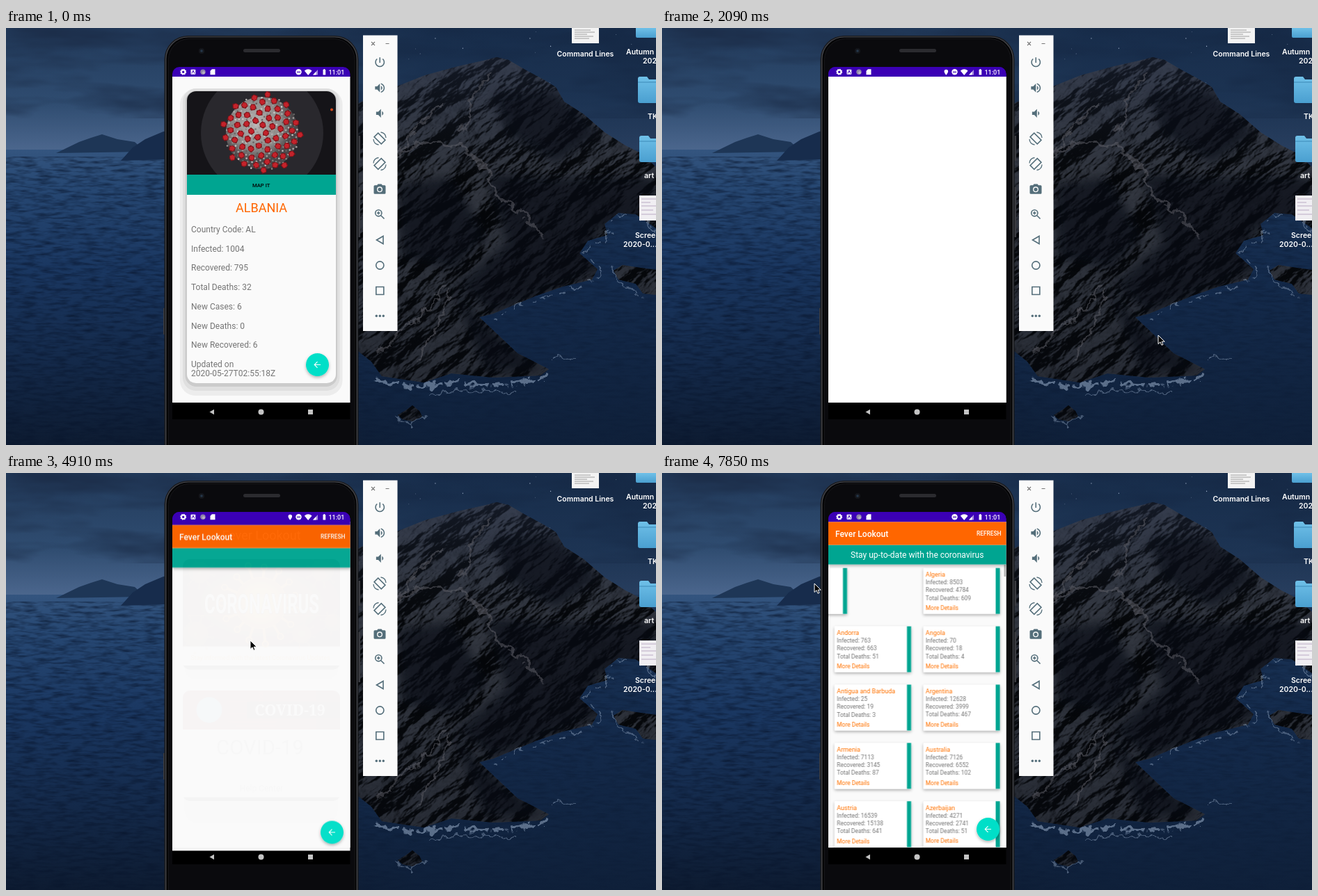
These frames come from a looping animation (934 px wide and 600 px high, 7.99 s). An HTML page:

```html
<!DOCTYPE html>
<html lang="en">
<head>
<meta charset="utf-8">
<title>Phone emulator on a desktop</title>
<style>
html, body { margin: 0; width: 100%; height: 100%; overflow: hidden; background: #0f1f38; }
svg { position: absolute; left: 0; top: 0; width: 934px; height: 600px; }
#scenery { will-change: transform; }
text { font-family: Roboto, sans-serif; }
.mid { text-anchor: middle; }
.grey { fill: #757575; }
.label { font: 600 10.5px Inter, sans-serif; fill: #fff; }
.t12 { font-size: 12px; }
.small { font-size: 8.4px; }
.medium { font-weight: 500; }
.slab { font-family: "Noto Serif", serif; font-weight: 900; }
.tool { fill: #546e7a; }
.line { fill: none; stroke: #546e7a; stroke-width: 1.6; }

#detail, #blank, #home, #list, #dim, #pin, #cursor, .loaded, .card, .swiped, .dragged {
  animation: 7.99s step-end infinite;
}
#blank, #home, #list, #dim, #pin, #cursor, .loaded { opacity: 0; }
#blank { animation-name: blank; }
#home { animation-name: home; }
#list { animation-name: list; }
#dim { animation-name: dim; }
#pin { animation-name: pin; }
.loaded { animation-name: loaded; }
#cursor { animation-name: cursor; }
.card.left { animation-name: up-right; }
.card.right { animation-name: step-left; }
.swiped { animation-name: swipe; }
.dragged { animation-name: drag; }

@keyframes blank {
  22.4% { opacity: .27; transform: translateY(25.5px); }
  24.28% { opacity: .8; transform: translateY(8px); }
  26.15%, 99% { opacity: 1; transform: none; }
}
@keyframes dim {
  22.4% { opacity: .35; }
  24.28% { opacity: .2; }
  26.15% { opacity: 0; }
  59.57% { opacity: .3; }
  61.45% { opacity: 0; }
}
@keyframes home {
  31.78% { opacity: .94; }
  33.66%, 99% { opacity: 1; }
}
@keyframes list {
  59.57% { opacity: .35; transform: translateY(24px); }
  61.45% { opacity: .98; transform: translateY(4.5px); }
  63.2%, 99% { opacity: 1; transform: none; }
}
@keyframes pin { 16.77% { opacity: 1; } 92.74% { opacity: 0; } }
@keyframes loaded { 68.83%, 99% { opacity: 1; } }
@keyframes step-left {
  89.11% { transform: translateX(-85px); }
  90.86%, 99% { transform: translateX(-127.5px); }
}
@keyframes up-right {
  89.11% { transform: translate(85px, -56px); }
  90.86%, 99% { transform: translate(127.5px, -83.9px); }
}
@keyframes swipe {
  83.47% { transform: translateX(100px); }
  85.35%, 99% { transform: translateX(350px); }
}
@keyframes drag { 98.24%, 99.9% { transform: translateX(-92px); } }
@keyframes cursor {
  7.5% { opacity: 1; transform: translate(916px, 36px); }
  9.38% { opacity: 1; transform: translate(790px, 260px); }
  11.13% { opacity: 1; transform: translate(708px, 430px); }
  13.01% { opacity: 1; transform: translate(713px, 442px); }
  37.42% { opacity: 1; transform: translate(680px, 418px); }
  39.17% { opacity: 1; transform: translate(600px, 373px); }
  41.05% { opacity: 1; transform: translate(440px, 277px); }
  42.92% { opacity: 1; transform: translate(365px, 240px); }
  44.68% { opacity: 1; transform: translate(352px, 236px); }
  54.06% { opacity: 1; transform: translate(351px, 241px); }
  70.71% { opacity: 1; transform: translate(348px, 235px); }
  72.46% { opacity: 1; transform: translate(340px, 222px); }
  74.34% { opacity: 1; transform: translate(330px, 205px); }
  76.22% { opacity: 1; transform: translate(318px, 188px); }
  77.97% { opacity: 1; transform: translate(309px, 175px); }
  79.84% { opacity: 1; transform: translate(303px, 168px); }
  81.72% { opacity: 1; transform: translate(300px, 165px); }
  83.47% { opacity: 1; transform: translate(400px, 165px); }
  85.35% { opacity: 1; transform: translate(650px, 165px); }
  87.23% { opacity: 1; transform: translate(391px, 157px); }
  89.11% { opacity: 1; transform: translate(340px, 158px); }
  90.86% { opacity: 1; transform: translate(320px, 160px); }
  92.74% { opacity: 1; transform: translate(311px, 159px); }
  98.24%, 99.9% { opacity: 1; transform: translate(219px, 159px); }
}
</style>
</head>
<body>
<svg id="scenery" viewBox="0 0 934 600">
  <defs>
    <linearGradient id="sky" x2="0" y2="1">
      <stop offset="0" stop-color="#223b5c"/><stop offset=".6" stop-color="#2f4c70"/><stop offset="1" stop-color="#4d688f"/>
    </linearGradient>
    <linearGradient id="rightShade"><stop offset=".35" stop-color="#10233f" stop-opacity="0"/><stop offset=".65" stop-color="#10233f" stop-opacity=".6"/></linearGradient>
    <linearGradient id="sea" x2="0" y2="1">
      <stop offset="0" stop-color="#34557f"/><stop offset=".12" stop-color="#274873"/><stop offset=".4" stop-color="#1a3761"/><stop offset=".7" stop-color="#142a4b"/><stop offset="1" stop-color="#0d1b31"/>
    </linearGradient>
    <linearGradient id="rockShade" x2="0" y2="1">
      <stop offset="0" stop-color="#2a3650" stop-opacity=".5"/><stop offset=".35" stop-color="#10161f" stop-opacity=".3"/><stop offset="1" stop-color="#0b101a" stop-opacity=".5"/>
    </linearGradient>
    <filter id="rock" x="0" y="0" width="1" height="1" color-interpolation-filters="sRGB">
      <feTurbulence type="fractalNoise" baseFrequency=".011 .03" numOctaves="6" seed="21"/>
      <feDiffuseLighting surfaceScale="34" diffuseConstant=".95" lighting-color="#454953"><feDistantLight azimuth="250" elevation="38"/></feDiffuseLighting>
    </filter>
    <filter id="waves" x="0" y="0" width="1" height="1" color-interpolation-filters="sRGB">
      <feTurbulence type="fractalNoise" baseFrequency=".045 .24" numOctaves="3" seed="3"/>
      <feColorMatrix values="0 0 0 0 .03  0 0 0 0 .08  0 0 0 0 .17  1.3 0 0 0 -.5"/>
    </filter>
    <filter id="clouds" x="0" y="0" width="1" height="1" color-interpolation-filters="sRGB">
      <feTurbulence type="fractalNoise" baseFrequency=".006 .024" numOctaves="4" seed="5"/>
      <feColorMatrix values="0 0 0 0 .11  0 0 0 0 .18  0 0 0 0 .29  2 0 0 0 -.8"/>
    </filter>
    <filter id="rough" x="-.1" y="-.2" width="1.2" height="1.4" color-interpolation-filters="sRGB">
      <feTurbulence type="fractalNoise" baseFrequency=".07" numOctaves="3" seed="4"/>
      <feDisplacementMap in="SourceGraphic" scale="20" xChannelSelector="R" yChannelSelector="G"/>
    </filter>
    <filter id="blur" x="-.3" y="-.3" width="1.6" height="1.6" color-interpolation-filters="sRGB"><feGaussianBlur stdDeviation="7"/></filter>
    <clipPath id="cliff">
      <path d="M490 115 562 84 602 68 650 55 690 46 705 42 722 46 746 60 772 74 790 85 802 106 830 124 860 150 890 169 912 180 934 200V288L905 268 880 266 860 282 864 298 836 306 824 324 850 347 842 362 800 372 760 386 700 411 680 416 735 468 780 491 768 500 700 503 640 497 600 510 540 501 525 480 500 460Z"/>
      <path d="M873 349 886 341 905 344 934 348V384L915 382 905 368 880 362ZM563 557 576 549 584 543 594 551 598 559 584 566 570 563Z"/>
    </clipPath>
  </defs>
  <rect width="934" height="180" fill="url(#sky)"/>
  <rect width="934" height="130" filter="url(#clouds)"/>
  <rect y="175" width="934" height="425" fill="url(#sea)"/>
  <rect y="185" width="934" height="415" filter="url(#waves)"/>
  <rect width="934" height="600" fill="url(#rightShade)"/>
  <path d="M72 180 105 164 122 158 138 153 160 160 185 164 200 178Z" fill="#1e3656"/>
  <path d="M165 191 182 172 200 160 226 149 260 145V188Z" fill="#172c4c"/>
  <g id="stars" fill="#a9bad2"></g>
  <g clip-path="url(#cliff)">
    <rect x="400" y="-40" width="640" height="700" transform="rotate(-38 712 300)" filter="url(#rock)"/>
    <rect x="490" y="30" width="444" height="550" fill="url(#rockShade)"/>
    <g filter="url(#blur)" fill="#080c15" opacity=".65">
      <path d="M700 95 790 90 850 150 790 195 720 150ZM565 225 640 215 690 300 645 345 570 330ZM640 370 680 420 770 490 690 495Z"/>
      <path d="M690 210 800 215 934 215V290L850 290 850 350 700 410 650 370 720 310Z"/>
    </g>
    <g filter="url(#rough)" fill="none" stroke="#62636b" stroke-width="4" opacity=".5">
      <path d="M545 190 600 165 655 168 690 205 708 245 740 262 770 300"/>
      <path d="M632 366 610 400 575 430 535 470M640 375 620 430 590 480M625 110 590 140 565 185M700 60 670 100 655 150" stroke-width="3"/>
    </g>
  </g>
  <g fill="none" stroke="#8ea2bc" filter="url(#rough)">
    <path d="M934 292 905 273 880 270 864 284 868 301 842 310 830 326 855 349 846 366 800 378 700 416" stroke-width="2" stroke-dasharray="16 9 7 12" opacity=".5"/>
    <path d="M530 505 600 517 640 508 700 514 770 506 786 494" stroke-width="5" stroke-dasharray="34 6 17 9" opacity=".6"/>
    <path d="M610 526 660 522 735 524M785 475 825 476M870 342 880 366 912 386M560 561 580 570 606 558" stroke-width="2" opacity=".45"/>
  </g>
</svg>

<svg viewBox="0 0 934 600">
  <defs>
    <linearGradient id="folder" x2="0" y2="1"><stop offset="0" stop-color="#6fc0e8"/><stop offset="1" stop-color="#4a9fd0"/></linearGradient>
    <radialGradient id="ember" r=".62"><stop offset="0" stop-color="#c25a0c"/><stop offset=".45" stop-color="#7d2f08"/><stop offset="1" stop-color="#2c0e06"/></radialGradient>
    <radialGradient id="core"><stop offset="0" stop-color="#ffcf45"/><stop offset=".6" stop-color="#f0920f"/><stop offset="1" stop-color="#b5500a"/></radialGradient>
    <radialGradient id="ball" cx=".42" cy=".38"><stop offset="0" stop-color="#b9b6b5"/><stop offset=".7" stop-color="#8b8887"/><stop offset="1" stop-color="#4b484a"/></radialGradient>
    <linearGradient id="maroon"><stop offset="0" stop-color="#7a0f1c"/><stop offset=".5" stop-color="#930e20"/><stop offset="1" stop-color="#5d0d16"/></linearGradient>
    <filter id="soft" x="-.2" y="-.2" width="1.4" height="1.5"><feDropShadow dx="0" dy="2" stdDeviation="2" flood-opacity=".3"/></filter>
    <clipPath id="screen"><path d="M239 563V66a10 10 0 0 1 10-10H484.500a10 10 0 0 1 10 10V563Z"/></clipPath>
    <clipPath id="listArea"><path d="M239 131.500H495V539H239Z"/></clipPath>
    <clipPath id="detailCard"><rect x="260" y="91" width="214" height="420" rx="13"/></clipPath>
    <clipPath id="newsCard"><rect x="254" y="124" width="226" height="159" rx="10"/></clipPath>
    <clipPath id="helpCard"><rect x="254" y="313" width="226" height="159" rx="10"/></clipPath>
    <g id="fab" filter="url(#soft)">
      <circle r="16.5" fill="#00dfc8"/>
      <path d="M4.5 0H-4M0-4.3-4.3 0 0 4.3" fill="none" stroke="#fff" stroke-width="1.1"/>
    </g>
    <g id="turn" class="line">
      <rect x="-4" y="-7.200" width="8" height="14.400" transform="rotate(-45)"/>
      <path d="M1.500-9Q8.500-8 9-1M-1.500 9Q-8.500 8-9 1" stroke-width="1.300"/>
    </g>
  </defs>

  <!-- desktop icons -->
  <path d="M813 0H852V22H813Z" fill="#f3f3f3"/>
  <path d="M817 3H840M817 6H846M817 9H835M817 12H844M817 15H838" stroke="#888" stroke-width=".8"/>
  <g fill="url(#folder)">
    <path d="M905 0H934V14H907a2 2 0 0 1-2-2Z"/>
    <path id="dir" d="M908 73q0-3 3-3h10l3 4h14V108H911q-3 0-3-3Z"/>
    <use href="#dir" x="2" y="85"/>
  </g>
  <path d="M908 78H934M910 163H934" stroke="#3d8ab8" stroke-width="1"/>
  <path d="M910 241H934V277H910Z" fill="#f0eef2"/>
  <path d="M913 246H934M913 251H926M913 256H934M913 262H930M913 268H934" stroke="#b9a9c4" stroke-width="1.2"/>
  <text class="label mid" x="832.5" y="41">Command Lines</text>
  <text class="label" x="891" y="38">Autumn Le</text><text class="label" x="915" y="51">202</text>
  <text class="label" x="922" y="131">TK</text><text class="label" x="917" y="216">art</text>
  <text class="label" x="904" y="302">Screen</text><text class="label" x="887" y="315">2020-0...</text>

  <!-- phone body -->
  <path d="M226 403h3v38h-3zM506 155h3v36h-3zM506 229h3v72h-3z" fill="#3a3b40"/>
  <rect x="227.500" y="11" width="279" height="640" rx="34" fill="#1b1c1f"/>
  <rect x="229.800" y="13" width="274.500" height="640" rx="32" fill="#050506" stroke="#4b4c52" stroke-width="1.200"/>
  <rect x="233.500" y="15.500" width="267.500" height="640" rx="30" fill="#0a0a0d" stroke="#1c1c20" stroke-width=".8"/>
  <rect x="341" y="30" width="53" height="5" rx="2.500" fill="#2b2b2f"/>
  <circle cx="281" cy="33" r="4" fill="#15171c"/><circle cx="281" cy="33" r="1.800" fill="#25374a"/>

  <!-- phone screen -->
  <g clip-path="url(#screen)">
    <path d="M239 56H495V563H239Z"/>
    <path d="M239 56H495V71H239Z" fill="#3b00b5"/>

    <g id="detail">
      <path d="M239 70H495V539H239Z" fill="#fafafa"/>
      <rect x="250" y="88" width="233.500" height="441" rx="22" fill="#ececec"/>
      <rect x="254" y="87" width="225.500" height="435" rx="19" fill="#dfdfdf"/>
      <rect x="257.500" y="90" width="218.500" height="426" rx="16" fill="#cbcbcb"/>
      <g clip-path="url(#detailCard)">
        <path d="M260 91H474V511H260Z" fill="#fafafa"/>
        <path d="M260 91H474V211H260Z" fill="#151418"/>
        <circle cx="368" cy="151" r="88" fill="#29282d"/>
        <circle cx="468" cy="117.500" r="2" fill="#d2491c"/>
        <circle cx="368" cy="151" r="52" fill="url(#ball)"/>
        <g id="virus"></g>
        <path d="M260 211H474V240H260Z" fill="#00a591"/>
      </g>
      <text class="mid medium" x="366.700" y="228.700" font-size="7.700">MAP IT</text>
      <text class="mid" x="367" y="265" font-size="18" fill="#f60">ALBANIA</text>
      <g id="facts" class="grey t12"></g>
      <use href="#fab" x="447.500" y="484.500"/>
    </g>

    <path id="dim" d="M239 82H495V563H239Z"/>

    <g id="blank">
      <path d="M239 56H495V539H239Z" fill="#fff"/>
      <path d="M239 56H495V70H239Z" fill="#3b00b5"/>
    </g>

    <g id="home">
      <path d="M239 70H495V539H239Z" fill="#fff"/>
      <path d="M239 70H495V106H239Z"/>
      <text class="mid" x="367" y="95.500" font-size="18" fill="#fff">Fever Lookout</text>
      <path d="M270 119H465Q488 120 490 150L493 270Q490 300 478 310H256Q243 300 240 270L244 150Q246 120 270 119Z" fill="#ebebeb"/>
      <rect x="240" y="302" width="253.500" height="217" rx="30" fill="#e7e7e7"/>
      <rect x="256" y="140" width="222" height="157.500" rx="18" fill="#d8d8d8"/>
      <rect x="256" y="330" width="221" height="174" rx="20" fill="#d6d6d6"/>
      <g clip-path="url(#newsCard)">
        <path d="M254 124H480V283H254Z" fill="#fff"/>
        <path d="M254 124H480V249.500H254Z" fill="url(#ember)"/>
        <g id="corona"></g>
        <path d="M262 205H472" stroke="#ff8a2a" stroke-width=".8" opacity=".7"/>
        <text class="mid" transform="translate(367.500 202) scale(1 1.650)" font-size="24" font-weight="700" fill="#f6ece0" stroke="#4a1c08" stroke-width=".8" paint-order="stroke">CORONAVIRUS</text>
        <path d="M254 277H480V283H254Z"/>
      </g>
      <text class="mid" x="365.500" y="269" font-size="9" fill="#ff7b00">Stay informed with the latest Coronavirus Updates</text>
      <g clip-path="url(#helpCard)">
        <path d="M254 313H480V472H254Z" fill="#fff"/>
        <path d="M254 313H480V369H254Z" fill="url(#maroon)"/>
        <path d="M254 329H350M290 346H420M254 358H400M330 364H440" stroke="#c02a3a" opacity=".35"/>
        <path d="M346 329H480V353H346Z" fill="#1d0a0d" opacity=".65"/>
        <circle cx="292" cy="341" r="18.500" fill="#4d93b8"/>
        <text class="mid slab" x="408" y="348.500" font-size="21.500" fill="#fff">COVID-19</text>
        <path d="M254 466.500H480V472H254Z"/>
      </g>
      <text class="mid grey" x="365" y="405" font-size="29.300">COVID-19</text>
      <text class="mid grey t12" x="367" y="457.500">Help Center</text>
    </g>

    <g id="list">
      <path d="M239 70H495V539H239Z" fill="#fafafa"/>
      <path d="M239 56H495V70.500H239Z" fill="#3b00b5"/>
      <g class="loaded">
        <g id="cards" clip-path="url(#listArea)"></g>
        <path d="M491.500 132H494V149H491.500Z" fill="#b4b4b4"/>
      </g>
      <path d="M239 103.500H495V131.500H239Z" filter="url(#soft)" fill="#00a591"/>
      <path d="M239 70.500H495V103.500H239Z" fill="#f60"/>
      <text class="medium t12" x="249" y="91.500" fill="#fff">Fever Lookout</text>
      <text class="medium" x="487.500" y="90" text-anchor="end" font-size="8.400" fill="#fff">REFRESH</text>
      <text class="loaded mid t12" x="366.700" y="122.300" fill="#fff">Stay up-to-date with the coronavirus</text>
      <use href="#fab" x="468.500" y="512.500"/>
    </g>

    <!-- status and navigation bars -->
    <g fill="#fff">
      <circle cx="254.700" cy="63.300" r="2.700" fill="none" stroke="#fff" stroke-width="2"/>
      <circle cx="254.700" cy="63.300" r="3.900" fill="none" stroke="#fff" stroke-width="1.200" stroke-dasharray="1.600 1.460"/>
      <rect x="265.500" y="59.800" width="6.800" height="7" rx=".8"/>
      <path d="M267 65.500 268.900 61 270.800 65.500" fill="none" stroke="#3b00b5"/>
      <circle cx="283" cy="63.300" r="3.700" fill="#8f86a8"/><circle cx="284" cy="64.300" r="2" fill="#b7b0c4"/>
      <path d="M296 59.300h4.500v8h-7v-5.500z"/>
      <path id="pin" d="M408.300 67.800c-1.800-2.500-2.800-3.800-2.800-5.300a2.800 2.800 0 0 1 5.600 0c0 1.500-1 2.800-2.800 5.300Z"/>
      <circle cx="420.500" cy="63.300" r="4.200"/><path d="M418 62.700h5v1.300h-5z" fill="#3b00b5"/>
      <path d="M428.800 61.500q5.400-4.500 10.800 0L434.200 68Z"/>
      <path d="M441 67.500 448 60v7.500z" opacity=".55"/><path d="M441 67.500 445.500 62.700v4.800z"/>
      <path d="M455.500 60h1v-.9h1.700V60h1v7.500h-3.700z"/>
      <text class="medium" x="463.500" y="66.900" font-size="9">11:01</text>
    </g>
    <g fill="#c4c4c4"><path d="M292.500 552.500 299 548.700V556.300Z"/><circle cx="366.500" cy="552.500" r="4"/><path d="M434 549h7v7h-7z"/></g>
  </g>

  <!-- emulator toolbar -->
  <rect x="513" y="10.500" width="49.500" height="425.500" fill="#fafafa"/>
  <path d="M525 20l5 5M530 20l-5 5M545.500 22.500h5" stroke="#777" stroke-width="1.100"/>
  <g class="tool">
    <path transform="translate(528 40) scale(.77)" d="M13 3h-2v10h2V3zm4.830 2.170l-1.420 1.420C17.990 7.860 19 9.810 19 12c0 3.870-3.130 7-7 7s-7-3.130-7-7c0-2.190 1.010-4.140 2.580-5.420L6.170 5.170C4.230 6.820 3 9.260 3 12c0 4.970 4.030 9 9 9s9-4.030 9-9c0-2.740-1.230-5.180-3.170-6.830z"/>
    <path transform="translate(528 77) scale(.77)" d="M3 9v6h4l5 5V4L7 9H3zm13.500 3c0-1.770-1.020-3.290-2.500-4.030v8.050c1.480-.730 2.500-2.250 2.500-4.020zM14 3.230v2.060c2.890.860 5 3.540 5 6.710s-2.110 5.850-5 6.710v2.060c4.010-.910 7-4.490 7-8.770s-2.990-7.860-7-8.770z"/>
    <path transform="translate(528 113.500) scale(.77)" d="M18.500 12c0-1.770-1.020-3.290-2.500-4.030v8.050c1.480-.730 2.500-2.250 2.500-4.020zM5 9v6h4l5 5V4L9 9H5z"/>
    <use href="#turn" transform="translate(537 159)"/>
    <use href="#turn" transform="translate(537 195.500) scale(-1 1)"/>
    <path d="M534.500 224.500h5l1.400 1.700h3q1.600 0 1.600 1.600v9.400q0 1.600-1.600 1.600h-13.800q-1.600 0-1.600-1.600v-9.400q0-1.600 1.600-1.600h3z"/>
    <circle cx="537" cy="232.300" r="3.300" fill="none" stroke="#fafafa" stroke-width="1.400"/>
    <circle class="line" cx="535.300" cy="266.300" r="4.600"/>
    <path class="line" d="M538.700 269.700 543.500 274.500"/>
    <path class="line" d="M533 266.300h4.600M535.300 264v4.600"/>
    <path class="line" d="M532.500 305 542 299.500V310.500Z"/>
    <circle class="line" cx="537.300" cy="341.500" r="5.600"/>
    <path class="line" d="M531.800 372.500h11v11h-11z"/>
    <circle cx="532.300" cy="414.300" r="1.700"/><circle cx="537.300" cy="414.300" r="1.700"/><circle cx="542.300" cy="414.300" r="1.700"/>
  </g>

  <path id="cursor" d="M0 0V12.500L3 9.800 5 14.300 7 13.400 5.100 9.200H9.200Z" stroke="#fff" stroke-width="1"/>
</svg>

<script>
const fill = (id, items, draw) => {
  document.getElementById(id).innerHTML = items.map(draw).join("");
};
const range = n => [...Array(n).keys()];
const random = n => Math.abs(Math.sin(n * 127.1 + 3) * 43758.5453) % 1;
const polar = (cx, cy, r, a) => [cx + r * Math.cos(a), cy + r * Math.sin(a)];

fill("stars", range(16), i =>
  `<circle cx="${560 + random(i) * 370}" cy="${random(i + 50) * 85}" r="${.3 + random(i + 9) * .4}"/>`);

// sunflower spread of grey grains under red spikes
const speck = (n, i) => polar(368, 151, 57 * Math.sqrt((i + .5) / n), i * 2.39996);
const grains = range(300).map(i => {
  const [x, y] = speck(340, i);
  return `<circle cx="${x}" cy="${y}" r="1.3" fill="hsl(20 3% ${35 + random(i) * 45}%)"/>`;
});
const spikes = range(60).map(i => {
  const [x, y] = speck(60, i);
  const turn = random(i) * 360;
  return `<g transform="translate(${x} ${y}) rotate(${turn})"><path d="M-5-1-2-5 3-4 5 0 2 5-3 3Z" fill="#7e1218"/>` +
    `<path d="M-4-1 0-4 4-1 2 3H-2Z" fill="#c3232b"/></g>`;
});
fill("virus", [...grains, ...spikes], s => s);

const infected = ([cx, cy, r, n, alpha]) => {
  const stalks = range(n).map(i => {
    const a = i * 2 * Math.PI / n + .2;
    const [x1, y1] = polar(cx, cy, r * .9, a);
    const [x2, y2] = polar(cx, cy, r * (1.35 + random(i) * .3), a);
    return `<path d="M${x1} ${y1}L${x2} ${y2}" stroke-width="${r / 10}"/>` +
      `<circle cx="${x2}" cy="${y2}" r="${r / 9}" fill="#8a3a08" stroke-width="${r / 20}"/>`;
  });
  return `<g opacity="${alpha}" stroke="#e8891a">${stalks.join("")}<circle cx="${cx}" cy="${cy}" r="${r}" fill="url(#core)"/></g>`;
};
fill("corona", [[278, 143, 15, 9, .3], [455, 140, 16, 10, .25], [272, 232, 18, 9, .3],
  [425, 232, 13, 8, .3], [470, 215, 12, 8, .25], [366, 187, 37, 15, 1]], infected);

fill("facts", ["Country Code: AL", "Infected: 1004", "Recovered: 795", "Total Deaths: 32",
  "New Cases: 6", "New Deaths: 0", "New Recovered: 6", "Updated on"],
  (s, i) => `<text x="266" y="${294 + 27.7 * i}">${s}</text>`);
document.getElementById("facts").insertAdjacentHTML("beforeend", '<text x="266" y="501.300">2020-05-27T02:55:18Z</text>');

const countries = [
  ["Afghanistan", 11831, 1128, 220], ["Albania", 1004, 795, 32],
  ["Algeria", 8503, 4784, 609], ["Andorra", 763, 663, 51],
  ["Angola", 70, 18, 4], ["Antigua and Barbuda", 25, 19, 3],
  ["Argentina", 12628, 3999, 467], ["Armenia", 7113, 3145, 87],
  ["Australia", 7126, 6552, 102], ["Austria", 16539, 15138, 641],
  ["Azerbaijan", 4271, 2741, 51]
];
const card = ([name, cases, recovered, deaths], i) => {
  const motion = i === 0 ? "swiped" : `card ${i % 2 ? "right" : "left"}`;
  return `<g class="${motion}"><g class="${i === 1 ? "dragged" : ""}">
    <g class="small" transform="translate(${248 + i % 2 * 127.5} ${136.7 + (i >> 1) * 83.9})">
      <rect width="110" height="66" rx="1" fill="#fff" filter="url(#soft)"/>
      <path d="M104 0h6v66h-6z" fill="#00a591"/>
      <text x="3.300" y="12.400" font-size="9" fill="#ff7200">${name}</text>
      <g class="grey"><text x="3.300" y="23.700">Infected: ${cases}</text>
      <text x="3.300" y="34.900">Recovered: ${recovered}</text>
      <text x="3.300" y="46.100">Total Deaths: ${deaths}</text></g>
      <text x="3.300" y="60.300" fill="#ff7200">More Details</text>
    </g></g></g>`;
};
// the first card lies on top while it is swiped away
document.getElementById("cards").innerHTML = countries.map(card).reverse().join("");
</script>
</body>
</html>
```
